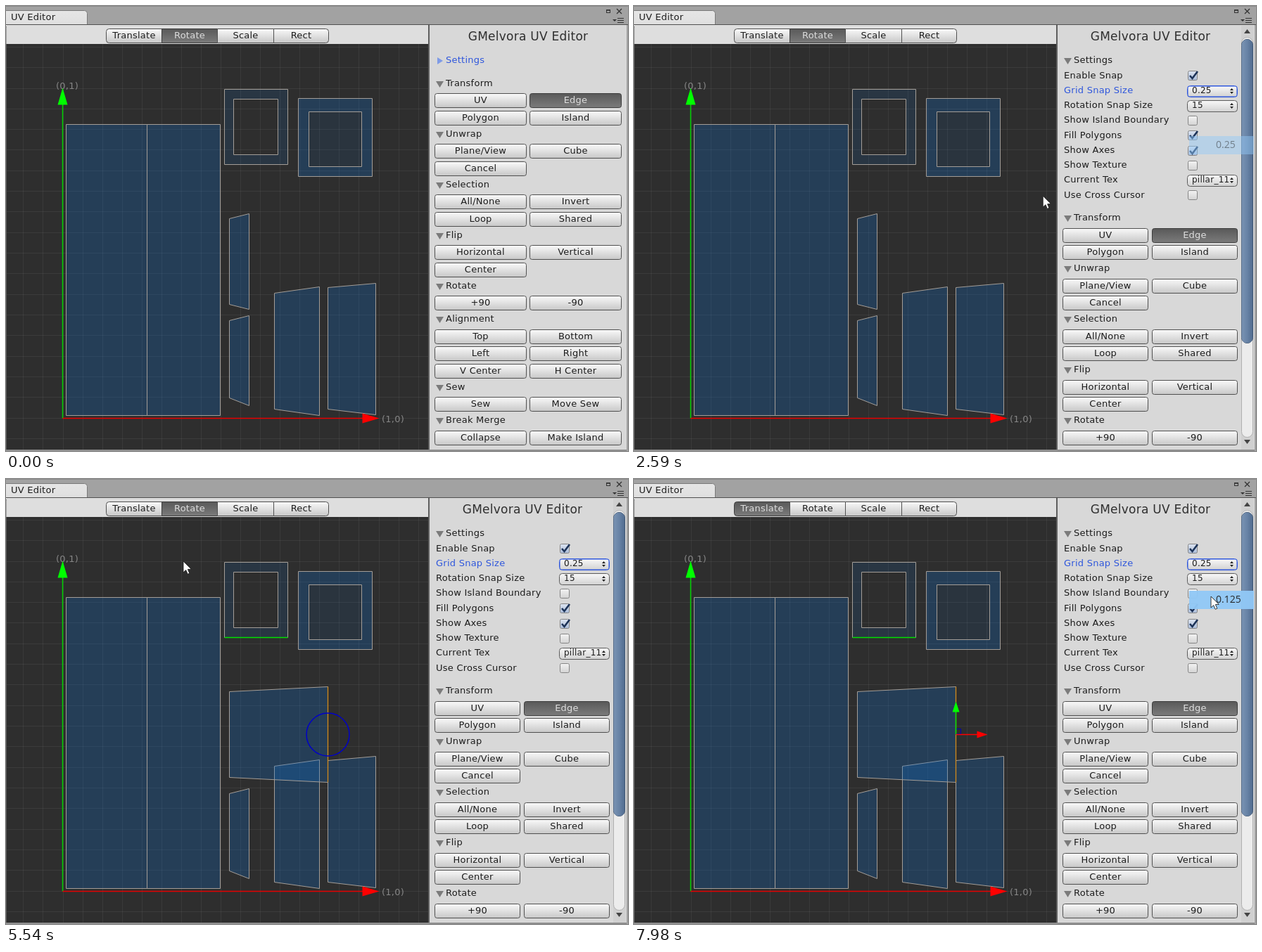
These frames come from a looping animation (884 px wide and 633 px high, 8 s). An HTML page with a canvas:

```html
<!DOCTYPE html>
<html lang="en">
<head>
<meta charset="utf-8">
<title>UV Editor</title>
<style>
html, body { margin: 0; width: 100%; height: 100%; overflow: hidden; background: #a2a2a2; }
canvas { display: block; }
</style>
</head>
<body>
<canvas id="stage" width="884" height="633"></canvas>
<script>
const g = document.getElementById('stage').getContext('2d');
const LOOP = 8000, UNIT_X = 449, UNIT_Y = 469;
const STEP_X = UNIT_X / 4, STEP_Y = UNIT_Y / 4;
const INK = '#1c1c1c', BLUE = '#2f57dc', OUTLINE = '#a39d97';
const FILL = 'rgba(10,110,206,.25)', FAINT = 'rgba(10,110,206,.1)';

// moments of the clicks
const EXPAND = 720, CHECK = 1430, OPEN_1 = 1800, PICK_1 = 2470, GRAB = 3110, HOVER = 3380,
      MOVE_TOOL = 5740, PULL = 6220, DROP = 7060, OPEN_2 = 7830, PICK_2 = 7970;
const SWEEP = 1520, HOME = [340, 347], PULL_X = 472;

// pointer moves: start, duration, goal
const MOVES = [
  [140, 540, 618, 76], [960, 330, 793, 104], [1530, 220, 815, 115], [1790, 530, 820, 194],
  [2460, 450, ...HOME], [GRAB, SWEEP, 421, 306], [4660, 240, 440, 262], [4900, 230, 432, 325],
  [5380, 330, 188, 43], [5800, 380, PULL_X, 364], [PULL, 300, 534, 365], [6620, 400, 443, 360],
  [DROP, 720, 815, 119], [OPEN_2, 40, 820, 167]
];

const SECTIONS = [
  ['Transform', 'UV', 'Edge', 'Polygon', 'Island'],
  ['Unwrap', 'Plane/View', 'Cube', 'Cancel'],
  ['Selection', 'All/None', 'Invert', 'Loop', 'Shared'],
  ['Flip', 'Horizontal', 'Vertical', 'Center'],
  ['Rotate', '+90', '-90'],
  ['Alignment', 'Top', 'Bottom', 'Left', 'Right', 'V Center', 'H Center'],
  ['Sew', 'Sew', 'Move Sew'],
  ['Break Merge', 'Collapse', 'Make Island']
];

const clamp = u => Math.max(0, Math.min(1, u));
const mix = (a, b, u) => a + (b - a) * u;

// an ever faster loop around the grabbed edge
function sweep(s) {
  const a = .54 * Math.PI * (s / 760) ** 2;
  const y = 309 + 110 * Math.sin((a - .54 * Math.PI) * 1.235);
  return [HOME[0] + 165 * Math.sin(a), mix(HOME[1], y, clamp(s / 300))];
}

function pointer(t) {
  if (t >= GRAB && t < GRAB + SWEEP) return sweep(t - GRAB);
  return MOVES.reduce(([x, y], [start, span, goalX, goalY]) => {
    const u = 1 - (1 - clamp((t - start) / span)) ** 2;
    return [mix(x, goalX, u), mix(y, goalY, u)];
  }, [420, 650]);
}

// the dragged edge jumps in quarter units
function edgeAt(t, [px, py]) {
  const snap = (d, step) => Math.round(d / step) * step;
  let x = 346, y = 364;
  if (t >= GRAB && t < 5130) {
    x += snap(px - HOME[0], STEP_X);
    y += snap(py - HOME[1], STEP_Y);
  } else if (t >= 5130) {
    x += STEP_X;
    if (t >= PULL && t < DROP) x += snap(px - PULL_X, STEP_X);
  }
  return { x: Math.round(x), y: Math.round(y) };
}

function text(s, x, y, color = INK, align = 'left', size = 13) {
  g.font = size + 'px "DejaVu Sans", sans-serif';
  g.letterSpacing = '0.25px';
  g.textAlign = align;
  g.textBaseline = 'middle';
  g.fillStyle = color;
  g.fillText(s, x, y);
}

function rect(x, y, w, h, color) {
  g.fillStyle = color;
  g.fillRect(x, y, w, h);
}

function shape(points, fill, stroke, width = 1) {
  g.beginPath();
  points.forEach(([x, y]) => g.lineTo(x, y));
  g.closePath();
  if (fill) { g.fillStyle = fill; g.fill(); }
  if (stroke) { g.strokeStyle = stroke; g.lineWidth = width; g.stroke(); }
}

function line(x1, y1, x2, y2, color, width = 1) {
  shape([[x1, y1], [x2, y2]], null, color, width);
}

function arrow(x, y, dx, dy, length, half, color) {
  shape([[x + dx * length, y + dy * length], [x + dy * half, y + dx * half], [x - dy * half, y - dx * half]], color);
}

function shaded(x, y, w, h, top, bottom, border, radii) {
  const fade = g.createLinearGradient(0, y, 0, y + h);
  fade.addColorStop(0, top);
  fade.addColorStop(1, bottom);
  g.beginPath();
  g.roundRect(x + .5, y + .5, w - 1, h - 1, radii);
  g.fillStyle = fade;
  g.fill();
  g.strokeStyle = border;
  g.lineWidth = 1;
  g.stroke();
}

function button(label, x, y, w, on, radii = 3) {
  shaded(x, y, w, 21, on ? '#585858' : '#fbfbfb', on ? '#7c7c7c' : '#c6c6c6', on ? '#3c3c3c' : '#505050', radii);
  text(label, x + w / 2, y + 10.5, on ? '#dedede' : INK, 'center');
}

function drawFrame(moveTool) {
  rect(0, 0, 884, 633, '#a2a2a2');
  rect(0, 0, 884, 1, '#8a8a8a');
  shaded(-2, 6, 118, 24, '#e6e6e6', '#dedede', '#7a7a7a', [0, 4, 0, 0]);
  text('UV Editor', 7, 17);
  g.strokeStyle = '#333';
  g.strokeRect(853.5, 5.5, 5, 4);
  line(853, 6, 859, 6, '#333', 1.5);
  line(868, 4, 875, 11, '#333', 1.3);
  line(875, 4, 868, 11, '#333', 1.3);
  shape([[862, 19], [868, 19], [865, 22]], '#333');
  for (let y = 17.5; y < 24; y += 3) line(869, y, 878, y, '#333');
  rect(0, 26, 884, 1, '#505050');
  rect(1, 27, 599, 27, '#dedede');
  ['Translate', 'Rotate', 'Scale', 'Rect'].forEach((label, i) => {
    const x = Math.round(142 + i * 79.2), end = Math.round(142 + (i + 1) * 79.2);
    button(label, x, 32, end - x + (i < 3), i === (moveTool ? 0 : 1),
      i === 0 ? [4, 0, 0, 4] : i === 3 ? [0, 4, 4, 0] : 0);
  });
}

const box = (x, y, w, h) => [[x, y], [x + w, y], [x + w, y + h], [x, y + h]];

// four-sided piece whose left side is shorter by rise and drop
function piece(x1, x2, top, bottom, rise = 0, drop = rise) {
  shape([[x1, top + rise], [x2, top], [x2, bottom], [x1, bottom - drop]], FILL, OUTLINE);
}

function ring(outer, inner, color, core) {
  g.beginPath();
  for (const [[x, y], , [x2, y2]] of [outer, inner]) g.rect(x, y, x2 - x, y2 - y);
  g.fillStyle = color;
  g.fill('evenodd');
  shape(outer, null, OUTLINE);
  shape(inner, core, OUTLINE);
}

function drawGizmo(t, x, y) {
  if (t < MOVE_TOOL) {
    g.beginPath();
    g.arc(x, y, 30.5, 0, 7);
    g.strokeStyle = '#0000c8';
    g.lineWidth = 1.5;
    g.stroke();
    return;
  }
  const axis = t >= PULL && t < DROP ? '#f0e000' : '#ff0000';
  shape(box(x, y - 8, 7, 7), null, '#0000b4');
  line(x, y, x, y - 34, '#00e000', 1.5);
  line(x, y, x + 31, y, axis, 1.5);
  arrow(x, y - 32, 0, -1, 15, 5, '#00ff00');
  arrow(x + 30, y, 1, 0, 15, 5, axis);
}

function drawView(t, { x, y }) {
  g.save();
  g.beginPath();
  g.rect(1, 54, 599, 578);
  g.clip();
  rect(0, 54, 601, 579, '#2e2e2e');
  for (let k = -2; k < 19; k++) {
    const gx = Math.floor(81 + k * UNIT_X / 16) + .5, gy = Math.floor(586 - k * UNIT_Y / 16) + .5;
    line(gx, 54, gx, 632, 'rgba(255,255,255,.03)');
    line(0, gy, 601, gy, 'rgba(255,255,255,.03)');
  }
  text('(0,1)', 87, 115, '#868686', 'center');
  text('(1,0)', 534, 589, '#868686');

  g.translate(-.5, -.5);
  piece(86, 201, 169, 583);
  piece(201, 305, 169, 583);
  ring(box(311, 119, 90, 107), box(324, 133, 63, 79), 'rgba(10,110,206,.13)');
  ring(box(416, 132, 105, 111), box(431, 151, 75, 78), FILL, FAINT);
  piece(318, 346, 441, 569, 7, 11);
  piece(382, 446, 400, 583, 9);
  piece(458, 526, 395, 582, 6, 8);
  piece(318, x, y - 68, y + 68, 7);

  line(81, 587, 81, 140, '#00d200', 1.5);
  line(81, 587, 508, 587, '#e60000', 1.5);
  arrow(81, 141, 0, -1, 24, 7, '#00ff00');
  arrow(507, 587, 1, 0, 24, 7, '#ff0000');

  if (t >= HOVER) line(311, 226, 401, 226, '#00e000', 1.5);
  if (t >= GRAB) {
    line(x, y - 68, x, y + 68, '#d08a1c', 1.3);
    drawGizmo(t, x, y);
  }
  g.restore();
  rect(0, 54, 1, 579, '#555');
  rect(600, 27, 2, 606, '#5e5e5e');
}

function header(label, y, open = true, color = INK) {
  const tint = color === BLUE ? '#7f9be6' : '#7b7b7b';
  shape(open ? [[611, y - 4], [622, y - 4], [616.5, y + 5]] : [[613, y - 5], [613, y + 5], [621, y]], tint);
  text(label, 625, y, color);
}

function checkbox(y, on, focus) {
  y = Math.round(y);
  shaded(787, y - 7, 14, 14, on ? '#dfe6f2' : '#f4f4f4', on ? '#a9bbd8' : '#d2d2d2', focus ? BLUE : '#858585', 2);
  if (!on) return;
  g.beginPath();
  g.moveTo(790, y);
  g.lineTo(793.5, y + 4);
  g.lineTo(801, y - 6);
  g.strokeStyle = '#1d3358';
  g.lineWidth = 2.6;
  g.stroke();
}

function dropdown(label, y, focus) {
  y = Math.round(y);
  shaded(786, y - 8, 72, 17, '#fafafa', '#d0d0d0', focus ? BLUE : '#5c5c5c', 4);
  if (focus) shape(box(787.5, y - 6.5, 69, 14), null, 'rgba(47,87,220,.5)');
  text(label, 793, y, INK, 'left', 12);
  for (const d of [-1, 1]) arrow(849.5, y + d, 0, d, 3, 2.5, '#222');
}

function drawSettings(t) {
  const checked = t >= CHECK, picked = t >= PICK_1;
  const rows = [
    ['Enable Snap', checked, checked && !picked],
    ['Grid Snap Size', picked ? '0.25' : '0.125', picked],
    ['Rotation Snap Size', '15'],
    ['Show Island Boundary', false],
    ['Fill Polygons', true],
    ['Show Axes', true],
    ['Show Texture', false],
    ['Current Tex', 'pillar_11'],
    ['Use Cross Cursor', false]
  ];
  rows.forEach(([label, value, focus], i) => {
    const y = 99.3 + i * 21.25;
    text(label, 611, y, focus ? BLUE : INK);
    if (typeof value === 'string') dropdown(value, y, focus);
    else checkbox(y, value, focus);
  });
}

function drawScrollbar() {
  rect(863, 28, 18, 604, '#d0d0d0');
  shaded(863, 44, 17, 570, '#ececec', '#ececec', '#b0b0b0', 8);
  shaded(863, 47, 17, 433, '#68a', '#68a', '#34465e', 8);
  const fade = g.createLinearGradient(863, 0, 880, 0);
  ['#7b94b4', '#6883a6', '#4f6a8d'].forEach((c, i) => fade.addColorStop(i / 2, c));
  g.fillStyle = fade;
  g.fill();
  arrow(871.5, 39, 0, -1, 6, 4.5, '#444');
  arrow(871.5, 617, 0, 1, 6, 4.5, '#444');
}

function drawPanel(t) {
  const open = t >= EXPAND;
  rect(602, 27, 282, 606, '#d8d8d8');
  text('GMelvora UV Editor', open ? 734 : 742, 44.5, '#303030', 'center', 17);
  header('Settings', 78, open, t < CHECK ? BLUE : INK);
  if (open) {
    drawSettings(t);
    drawScrollbar();
  }
  const w = open ? 122 : 131, right = open ? 736 : 744;
  let y = open ? 302.3 : 111;
  for (const [name, ...labels] of SECTIONS) {
    if (y > 625) break;
    header(name, Math.round(y));
    y += 23.9;
    labels.forEach((label, i) => {
      const top = Math.round(y + (i >> 1) * 24.6 - 10.5);
      if (top < 622) button(label, i % 2 ? right : 609, top, w, label === 'Edge');
    });
    y += (Math.ceil(labels.length / 2) - 1) * 24.6 + 23.5;
  }
  rect(0, 631, 884, 2, '#8e8e8e');
  rect(882, 27, 2, 606, '#a2a2a2');
}

function menuItem(i, lit) {
  const y = 133 + i * 26.3;
  if (lit) rect(789, Math.floor(y), 92, 26, '#91c9f7');
  g.font = '14px "Open Sans", sans-serif';
  g.letterSpacing = '0px';
  g.textAlign = 'left';
  g.textBaseline = 'middle';
  g.fillStyle = '#222';
  g.fillText(2 ** (i - 4), 827, y + 13);
}

function drawMenu(t, py) {
  if ((t >= OPEN_1 && t < PICK_1) || (t >= OPEN_2 && t < PICK_2)) {
    rect(786, 130, 98, 140, '#a0a0a0');
    rect(787, 131, 97, 138, '#f0f0f0');
    const lit = Math.floor((py - 133) / 26.3);
    for (let i = 0; i < 5; i++) menuItem(i, i === lit);
  }
  // the chosen item lingers and fades
  [[2, PICK_1], [1, PICK_2]].forEach(([i, start]) => {
    if (t < start) return;
    g.globalAlpha = clamp(1 - (t - start) / 230);
    menuItem(i, true);
    g.globalAlpha = 1;
  });
}

function drawPointer(x, y) {
  const outline = [[0, 0], [0, 16], [3.7, 12.6], [6.2, 18.3], [8.8, 17.2], [6.4, 11.6], [11.3, 11.3]];
  shape(outline.map(([a, b]) => [x + a, y + b]), '#fff', '#222', .9);
}

function draw(t) {
  const p = pointer(t);
  drawFrame(t >= MOVE_TOOL);
  drawView(t, edgeAt(t, p));
  drawPanel(t);
  drawMenu(t, p[1]);
  drawPointer(...p);
}

const start = performance.now();
function tick() {
  draw((performance.now() - start) % LOOP);
  requestAnimationFrame(tick);
}
tick();
</script>
</body>
</html>
```
